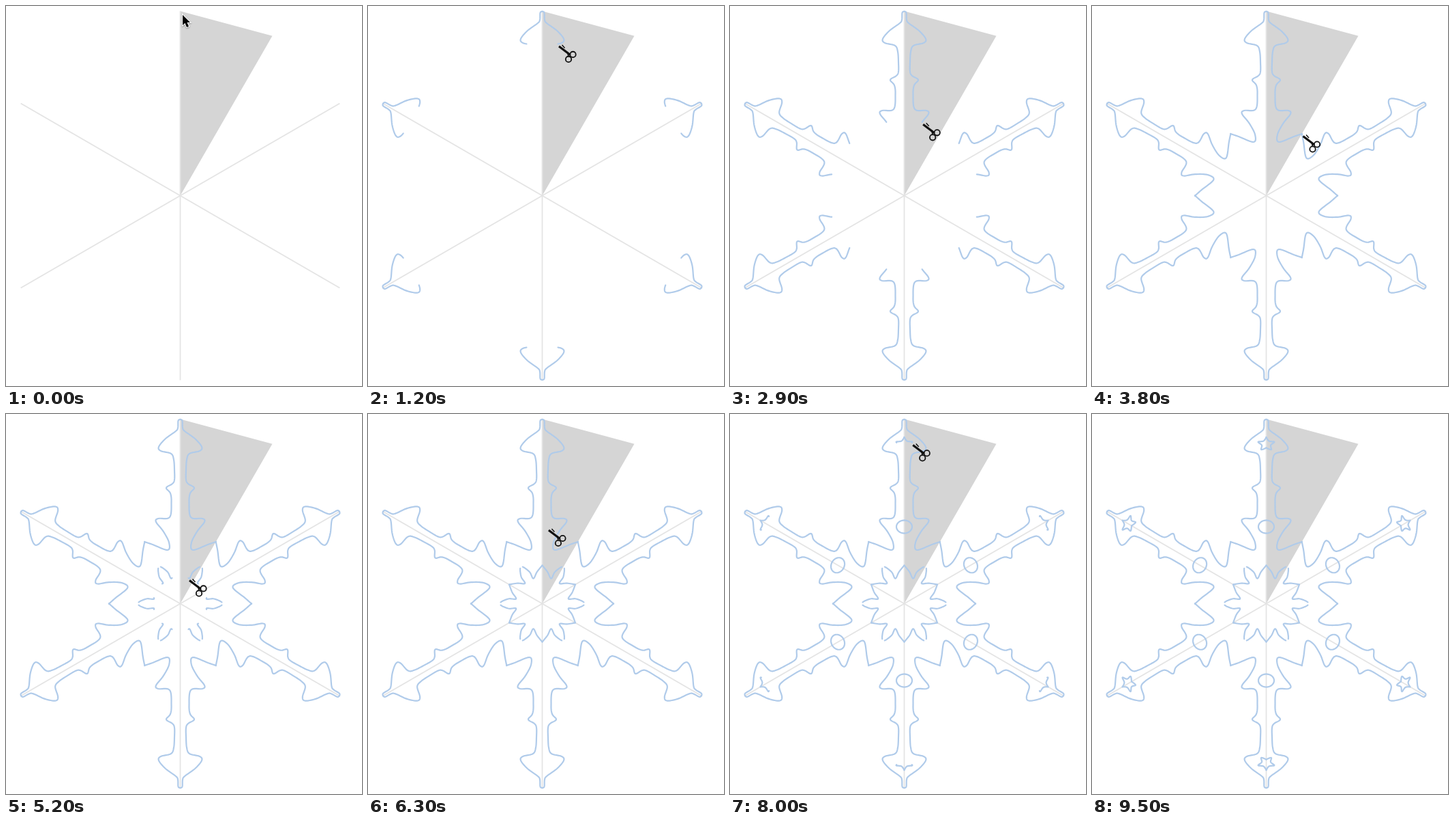
An HTML page with a canvas for the animation above (9600 ms loop, 522x556 px).

```html
<!DOCTYPE html>
<html lang="en">
<head>
<meta charset="utf-8">
<title>Paper snowflake</title>
<style>
  html, body { margin: 0; width: 100%; height: 100%; overflow: hidden; background: #fff; }
  canvas { display: block; }
</style>
</head>
<body>
<canvas id="stage" width="522" height="556"></canvas>
<script>
const ctx = document.getElementById('stage').getContext('2d');
const LOOP = 9600, STEP = 100, TAU = Math.PI * 2;
const CX = 255.5, CY = 277.5, RADIUS = 270;

const mix = (a, b, u) => a + (b - a) * u;
const clamp = v => Math.max(0, Math.min(1, v));
const range = (count, make) => Array.from({ length: count }, (_, i) => make(i));
const distance = (a, b) => Math.hypot(b[0] - a[0], b[1] - a[1]);
const along = (a, b, u) => [mix(a[0], b[0], u), mix(a[1], b[1], u)];

// Point at an angle clockwise from straight up.
const polar = (x, y, rx, ry, angle) => [x + rx * Math.sin(angle), y - ry * Math.cos(angle)];

function spline(a, b, c, d, u) {
  return 0.5 * (2 * b + (c - a) * u + (2 * a - 5 * b + 4 * c - d) * u * u
    + (3 * b - a - 3 * c + d) * u * u * u);
}

function smooth(points, steps = 8) {
  const at = i => points[Math.max(0, Math.min(points.length - 1, i))];
  return range((points.length - 1) * steps + 1, n => {
    const i = Math.floor(n / steps), u = n / steps - i;
    return [0, 1].map(axis =>
      spline(at(i - 1)[axis], at(i)[axis], at(i + 1)[axis], at(i + 2)[axis], u));
  });
}

const edge = smooth([
  [256, 8], [258.5, 10], [259, 20], [262, 25], [277, 36], [287, 48], [284, 54],
  [269, 58], [265, 67], [264, 82], [264, 96], [267, 102], [276, 108], [270, 116],
  [268.5, 129], [271, 151], [288, 153], [291, 158], [280.5, 171.5], [272, 188],
  [274, 199], [296, 191], [308, 187]
]);
const petal = smooth([[61, 28], [57, 25.5], [49, 21.5], [39, 19.5], [47, 9.5], [56, 0]]
  .map(([r, degrees]) => polar(CX, CY, r, r, degrees * TAU / 360)));
const hole = range(25, i => polar(CX, 165, 11.5, 9.5, i / 24 * Math.PI));
const star = smooth(range(6, i => {
  const r = i % 2 ? 5.5 : 10;
  return polar(CX, 44, r * 1.25, r, i * Math.PI / 5);
}));

// Each cut is made once, then mirrored and turned six ways.
const cuts = [
  { from: 700, to: 3800, line: edge },
  { from: 4700, to: 5800, line: petal },
  { from: 6400, to: 7000, line: hole },
  { from: 7550, to: 8800, line: star }
];

const ENTER = { to: 100, line: [[262, 13]] };
const EXIT = { from: 9500, line: [[520, 606]] };
const stops = [ENTER, ...cuts, EXIT];

function partialLine(line, share) {
  const total = line.slice(1).reduce((sum, p, i) => sum + distance(line[i], p), 0);
  let left = total * share;
  const out = [line[0]];
  for (let i = 1; i < line.length; i++) {
    const length = distance(line[i - 1], line[i]);
    if (length >= left) {
      out.push(along(line[i - 1], line[i], left / length));
      break;
    }
    out.push(line[i]);
    left -= length;
  }
  return out;
}

function cutSoFar(cut, t) {
  const u = clamp((t - cut.from) / (cut.to - cut.from));
  return u < 1 ? partialLine(cut.line, u ** 0.8) : cut.line;
}

// The hand follows the current cut and swings slightly right between cuts.
function cursorAt(t) {
  const cutting = cuts.find(cut => t >= cut.from && t <= cut.to);
  if (cutting) return cutSoFar(cutting, t).at(-1);
  const next = stops.findIndex(stop => stop.from > t);
  if (next < 1) return null;
  const a = stops[next - 1], b = stops[next];
  const start = a.line.at(-1), end = b.line[0];
  const u = (t - a.to) / (b.from - a.to);
  const bow = Math.min(16, distance(start, end) * 0.24);
  const [x, y] = along(start, end, u);
  return [x + bow * Math.sin(Math.PI * u), y];
}

function tracePath(points) {
  ctx.beginPath();
  for (const [x, y] of points) ctx.lineTo(x, y);
}

function drawPaper() {
  ctx.fillStyle = '#fff';
  ctx.fillRect(0, 0, 522, 556);
  const tips = range(6, k => polar(CX, CY, RADIUS, RADIUS, k * TAU / 6));
  tracePath([[CX, CY], tips[0], polar(CX, CY, RADIUS, RADIUS, TAU / 12)]);
  ctx.fillStyle = '#d5d5d5';
  ctx.fill();
  ctx.strokeStyle = '#e4e4e4';
  ctx.lineWidth = 1.8;
  for (const tip of tips) {
    tracePath([[CX, CY], tip]);
    ctx.stroke();
  }
}

function drawCut(line) {
  ctx.strokeStyle = '#b0cbea';
  ctx.lineWidth = 2.2;
  ctx.lineJoin = ctx.lineCap = 'round';
  for (let k = 0; k < 12; k++) {
    ctx.save();
    ctx.translate(CX, CY);
    ctx.rotate((k >> 1) * TAU / 6);
    if (k % 2) ctx.scale(-1, 1);
    ctx.translate(-CX, -CY);
    tracePath(line);
    ctx.stroke();
    ctx.restore();
  }
}

function drawArrow(x, y) {
  ctx.save();
  ctx.translate(x, y);
  tracePath([[0, 0], [0, 15], [3.5, 12], [6, 18], [9, 17], [6.5, 11], [11, 11]]);
  ctx.closePath();
  ctx.shadowColor = 'rgba(0,0,0,.35)';
  ctx.shadowBlur = 2;
  ctx.shadowOffsetY = 1;
  ctx.strokeStyle = '#fff';
  ctx.lineWidth = 2;
  ctx.stroke();
  ctx.shadowColor = 'transparent';
  ctx.fillStyle = '#000';
  ctx.fill();
  ctx.restore();
}

function drawScissors(x, y) {
  const blade = (width, ...points) => {
    ctx.lineWidth = width;
    tracePath(points);
    ctx.stroke();
  };
  const ring = (cx, cy) => {
    ctx.lineWidth = 1.8;
    ctx.beginPath();
    ctx.arc(cx, cy, 4.2, 0, TAU);
    ctx.stroke();
  };
  ctx.save();
  ctx.translate(x, y);
  ctx.strokeStyle = '#111';
  ctx.lineCap = 'butt';
  blade(3.2, [0.5, 2.5], [17, 15]);
  blade(1.4, [5, 0.5], [9, 5]);
  blade(1.8, [13, 11], [14.5, 17]);
  ring(21, 14.5);
  ring(14.5, 21.5);
  ctx.restore();
}

function draw(t) {
  drawPaper();
  for (const cut of cuts) {
    if (t > cut.from) drawCut(cutSoFar(cut, t));
  }
  const cursor = cursorAt(t);
  if (t < ENTER.to) drawArrow(259, 13);
  else if (cursor) drawScissors(cursor[0] + 1, cursor[1] + 1);
}

function tick() {
  const t = performance.now() % LOOP;
  draw(Math.floor(t / STEP) * STEP);
  requestAnimationFrame(tick);
}
tick();
</script>
</body>
</html>
```
